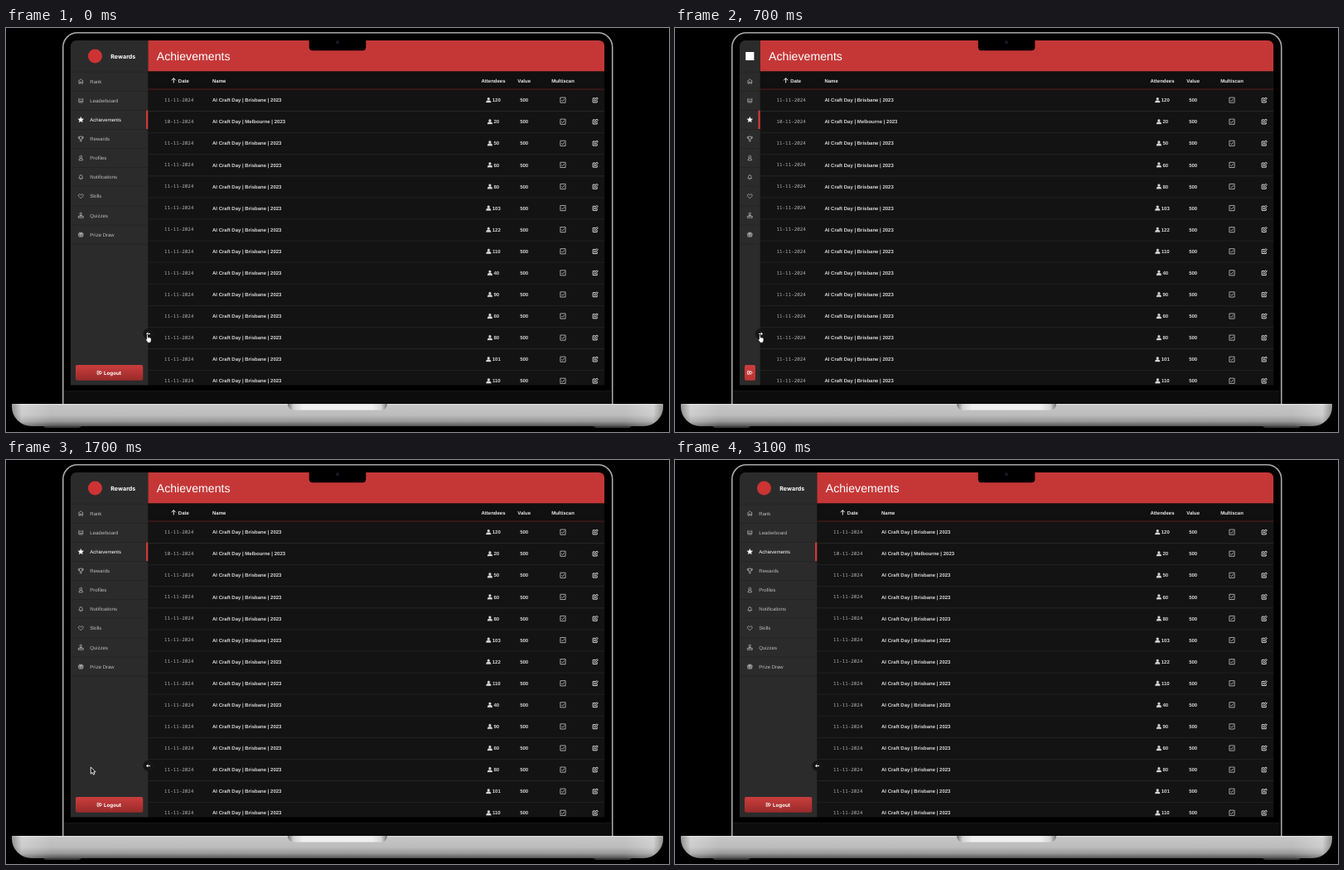
An HTML page with a canvas for the animation above (3400 ms loop, 800 by 488 pixels).

```html
<!DOCTYPE html>
<html lang="en">
<head>
<meta charset="utf-8">
<title>Achievements admin</title>
<style>
html, body { margin: 0; width: 100%; height: 100%; overflow: hidden; background: #000; }
canvas { display: block; width: 800px; height: 488px; }
</style>
</head>
<body>
<canvas id="stage"></canvas>
<script>
const W = 800, H = 488, LOOP = 3400, STEP = 100;
const SANS = '"Liberation Sans", Arial, sans-serif';
const MONO = '"Noto Sans Mono", "DejaVu Sans Mono", monospace';
const INTER = 'Inter, sans-serif';
const canvas = document.getElementById('stage');
const ctx = canvas.getContext('2d');
const dpr = window.devicePixelRatio || 1;
canvas.width = W * dpr;
canvas.height = H * dpr;

const MENU = [
  ['Rank', 'home'], ['Leaderboard', 'crowd'], ['Achievements', 'star'],
  ['Rewards', 'cup'], ['Profiles', 'user'], ['Notifications', 'bell'],
  ['Skills', 'heart'], ['Quizzes', 'quiz'], ['Prize Draw', 'gift']
];
const COUNTS = [120, 20, 50, 60, 80, 103, 122, 110, 40, 90, 60, 80, 101, 110];

// Icons are centred on 0,0 and about 7 units wide
const ICON = {
  home: 'M-3 -.2L0 -2.8L3 -.2M-2.3 -.8V2.6H-.8V.6H.8V2.6H2.3V-.8',
  crowd: 'M-3.2 -1.6L-1.5 -.6L0 -2L1.5 -.6L3.2 -1.6M-2.8 -.6L-2.2 2.3H2.2L2.8 -.6M-1.6 .8H1.6M-2.6 -2.4H-1.5M1.5 -2.4H2.6',
  star: 'M0 -3.4L1 -1.1L3.4 -.9L1.6 .7L2.1 3.1L0 1.8L-2.1 3.1L-1.6 .7L-3.4 -.9L-1 -1.1Z',
  cup: 'M-1.7 -2.8H1.7V-.8A1.7 1.7 0 0 1 -1.7 -.8ZM-1.7 -2.1H-3.2Q-3.1 0 -1.4 .1M1.7 -2.1H3.2Q3.1 0 1.4 .1M0 1V2.7M-1.5 2.8H1.5',
  user: 'M1.5 -1.3A1.5 1.5 0 1 1 -1.5 -1.3A1.5 1.5 0 1 1 1.5 -1.3M-2.3 2.8Q-2.3 .5 -.8 .4H.8Q2.3 .5 2.3 2.8Z',
  bell: 'M-2.4 1.6Q-1.7 .8 -1.7 -.7A1.7 1.7 0 0 1 1.7 -.7Q1.7 .8 2.4 1.6ZM0 -2.4V-3M-.7 2.6H.7',
  heart: 'M0 2.6L-2.5 .1C-4 -1.6 -1.5 -3.6 0 -1.5C1.5 -3.6 4 -1.6 2.5 .1Z',
  quiz: 'M1.2 -2.1A1.2 1.2 0 1 1 -1.2 -2.1A1.2 1.2 0 1 1 1.2 -2.1M0 -.9V1M-3 1H3V2.9H-3ZM-1.7 1Q-1.6 -.2 0 -.2Q1.6 -.2 1.7 1',
  gift: 'M-2.9 -1.2H2.9V.3H-2.9ZM-2.4 .3V2.6H2.4V.3M-.7 -1.2V2.6M.7 -1.2V2.6M0 -1.2Q-2.2 -1.4 -1.6 -2.6Q-.5 -3 0 -1.2Q.5 -3 1.6 -2.6Q2.2 -1.4 0 -1.2',
  exit: 'M-.6 -2H-2.8V2H-.6M-1.1 -.7H.6V-2L2.9 0L.6 2V.7H-1.1Z',
  person: 'M1.5 -1.5A1.5 1.5 0 1 1 -1.5 -1.5A1.5 1.5 0 1 1 1.5 -1.5M-3 2.9Q-3 .4 -1.2 .3H1.2Q3 .4 3 2.9Z',
  check: 'M-3.1 -3.1H3.1V3.1H-3.1ZM-1.7 0L-.4 1.3L1.9 -1.4',
  edit: 'M.4 -2.3H-2.8V2.8H2.2V.4M-.9 1L-.7 -.5L2.1 -3.2L3.3 -2L.5 .8Z',
  up: 'M0 3V-2.7M-2.5 -.2L0 -2.8L2.5 -.2',
  left: 'M2.2 0H-2M-.4 -1.7L-2.1 0L-.4 1.7',
  arrow: 'M0 0V8.2L1.9 6.5L3.2 9.2L4.6 8.5L3.3 5.9H5.8Z',
  hand: 'M-.9 .9Q-.8 0 0 0T.9 .9V3.5Q1.6 2.9 2.2 3.7Q3 3.2 3.5 4Q4.5 3.7 4.7 4.7V7.3Q4.5 8.6 3.9 9.1V10H-.1V9.1Q-1.4 7.7 -2.3 5.7Q-2.1 4.7 -.9 5.8Z'
};
const shapes = {};
for (const k in ICON) shapes[k] = new Path2D(ICON[k]);

function icon(name, x, y, color, opt = {}) {
  ctx.save();
  ctx.translate(x, y);
  ctx.scale(opt.flip ? -1 : 1, 1);
  if (opt.fill) {
    ctx.fillStyle = opt.fill;
    ctx.fill(shapes[name]);
  }
  ctx.strokeStyle = color;
  ctx.lineWidth = opt.width || 0.7;
  ctx.lineJoin = 'round';
  ctx.stroke(shapes[name]);
  ctx.restore();
}

function text(str, x, y, font, color, align = 'left') {
  ctx.font = font;
  ctx.fillStyle = color;
  ctx.textAlign = align;
  ctx.fillText(str, x, y);
}

function rect(x, y, w, h, fill, r = 0) {
  ctx.fillStyle = fill;
  ctx.beginPath();
  ctx.roundRect(x, y, w, h, r);
  ctx.fill();
}

function disc(x, y, r, fill) {
  ctx.fillStyle = fill;
  ctx.beginPath();
  ctx.arc(x, y, r, 0, Math.PI * 2);
  ctx.fill();
}

function gradient(x0, y0, x1, y1, ...stops) {
  const g = ctx.createLinearGradient(x0, y0, x1, y1);
  for (const [at, c] of stops) g.addColorStop(at, c);
  return g;
}

function drawLid() {
  rect(68, 5, 664.5, 452, '#a9a9a9', [18, 18, 0, 0]);
  rect(69.6, 6.6, 661.3, 450, '#000', [16.5, 16.5, 0, 0]);
  rect(70, 438.5, 660.5, 16, '#0c0c0c');
  rect(70, 438.5, 660.5, 0.6, '#252525');
}

function drawBase() {
  rect(45, 479, 46, 4, '#3a3a3a', [0, 0, 4, 4]);
  rect(709, 479, 46, 4, '#3a3a3a', [0, 0, 4, 4]);
  const body = [1, 1, 24, 24];
  rect(7, 454, 786, 27, gradient(0, 454, 0, 481,
    [0, '#dedede'], [0.08, '#c5c5c5'], [0.5, '#bcbcbc'], [0.78, '#999'], [1, '#555']), body);
  rect(7, 454, 786, 27, gradient(7, 0, 793, 0,
    [0, 'rgba(0,0,0,.25)'], [0.015, 'rgba(255,255,255,.25)'], [0.06, 'rgba(255,255,255,0)'],
    [0.94, 'rgba(255,255,255,0)'], [0.985, 'rgba(255,255,255,.25)'], [1, 'rgba(0,0,0,.25)']), body);
  rect(340, 454, 120, 7.5, gradient(340, 0, 460, 0,
    [0, '#777'], [0.06, '#d5d5d5'], [0.15, '#efefef'], [0.85, '#efefef'], [0.94, '#d5d5d5'], [1, '#777']),
    [0, 0, 7, 7]);
}

function drawTable(edge) {
  const bold = '700 6px ' + SANS;
  const head = '#e8e8e8';
  rect(edge, 15, 722 - edge, 37.5, '#c53737');
  text('Achievements', edge + 10.4, 38.9, '14.15px ' + SANS, '#fff');
  rect(edge, 52.5, 722 - edge, 21.5, '#101010');
  rect(edge, 73.6, 722 - edge, 0.9, '#5e1c1c');
  icon('up', edge + 31, 63.4, head, { width: 1 });
  text('Date', edge + 36.5, 65.7, bold, head);
  text('Name', edge + 77.7, 65.7, bold, head);
  text('Attendees', 588, 65.7, bold, head, 'center');
  text('Value', 625.2, 65.7, bold, head, 'center');
  text('Multiscan', 672, 65.7, bold, head, 'center');

  COUNTS.forEach((n, i) => {
    const y = 87.1 + i * 26.09;
    const city = i === 1 ? 'Melbourne' : 'Brisbane';
    rect(edge, y + 13, 722 - edge, 0.8, '#252525');
    text(i === 1 ? '10-11-2024' : '11-11-2024', edge + 19.8, y + 1.8, '5.9px ' + MONO, '#b4b4b4');
    text('AI Craft Day | ' + city + ' | 2023', edge + 77.7, y + 2.2, bold, '#d6d6d6');
    const wide = ctx.measureText(n).width + 7.5;
    const x = 588 - wide / 2;
    icon('person', x + 3, y, '#d6d6d6', { fill: '#d6d6d6', width: 0.2 });
    text(n, x + 7.5, y + 2.2, bold, '#d6d6d6');
    text('500', 625.2, y + 2.2, bold, '#d6d6d6', 'center');
    icon('check', 672, y, '#d0d0d0', { width: 0.75 });
    icon('edit', 711, y, '#e2e2e2', { width: 0.95 });
  });
}

function drawSidebar(edge, open) {
  rect(78, 15, edge - 78, 416.5, '#2b2b2b');
  if (open) {
    disc(107.5, 34, 8.5, '#cc3333');
    text('Rewards', 126.3, 36.5, '700 7.1px ' + INTER, '#fff');
  } else {
    rect(85.2, 28.9, 10.2, 10.2, '#fff');
  }
  MENU.forEach(([label, name], i) => {
    const y = 64.5 + i * 23.12;
    const on = i === 2;
    const color = on ? '#fff' : '#bcbcbc';
    rect(78, y - 11.8, edge - 78, 0.7, '#222');
    icon(name, 90.3, y, color, { fill: on && '#fff', width: on ? 0.3 : 0.7 });
    if (open) text(label, 101.3, y + 2.2, '6px ' + SANS, color);
    if (on) rect(edge - 2.2, y - 11.2, 2.2, 22.6, '#d03c3c');
  });
  rect(78, 260.8, edge - 78, 0.7, '#222');
  rect(84, 407, open ? 81.3 : 13, 18.8, gradient(0, 407, 0, 426, [0, '#cc3d3d'], [1, open ? '#982a2a' : '#bd3333']), 2);
  icon('exit', open ? 113 : 90.4, 416.3, '#fff', { width: 0.8 });
  if (open) text('Logout', 118, 418.7, '700 6.2px ' + INTER, '#fff');
}

function drawScreen(open) {
  const edge = open ? 171.3 : 102.7;
  ctx.save();
  ctx.beginPath();
  ctx.roundRect(78, 15, 644.3, 416.5, [7, 7, 0, 0]);
  ctx.clip();
  rect(78, 15, 645, 417, '#131313');
  drawTable(edge);
  drawSidebar(edge, open);
  disc(edge + 0.5, 369.4, 6.4, '#161616');
  icon('left', edge + 0.5, 369.4, '#fff', { width: 1, flip: !open });
  ctx.restore();
  rect(365.8, 14, 68.5, 13.2, '#000', [0, 0, 4, 4]);
  disc(400, 17.3, 2.2, '#111318');
  disc(400, 17.3, 1, '#1c2430');
  return edge + 0.5;
}

function ease(t, from, to) {
  const p = Math.min(1, Math.max(0, (t - from) / (to - from)));
  return p * p * (3 - 2 * p);
}

function pointerAt(t) {
  if (t < 1700) return [170.4 - 68.3 * ease(t, 100, 650), 370.2];
  const p = ease(t, 1700, 2600);
  return [102.3 + 455.2 * p, 370.9 - 195.6 * p];
}

function drawPointer(t, toggleX) {
  if (t >= 3000) return;
  const [x, y] = pointerAt(t);
  if (t >= 1400 && t < 1500) disc(x + 0.4, y + 1.3, 17, 'rgba(255,255,255,.14)');
  const over = Math.hypot(x - toggleX, y - 369.4) < 6.4;
  if (over) icon('hand', x + 0.2, y, '#000', { fill: '#fff', width: 0.8 });
  else icon('arrow', x, y, '#fff', { fill: '#000', width: 0.9 });
}

function draw(now) {
  const t = Math.floor((now % LOOP) / STEP) * STEP;
  ctx.setTransform(dpr, 0, 0, dpr, 0, 0);
  ctx.textRendering = 'geometricPrecision';
  rect(0, 0, W, H, '#000');
  drawLid();
  const toggleX = drawScreen(t < 100 || t >= 1700);
  drawBase();
  drawPointer(t, toggleX);
}

const start = performance.now();
function tick() {
  draw(performance.now() - start);
  requestAnimationFrame(tick);
}
tick();
</script>
</body>
</html>
```
